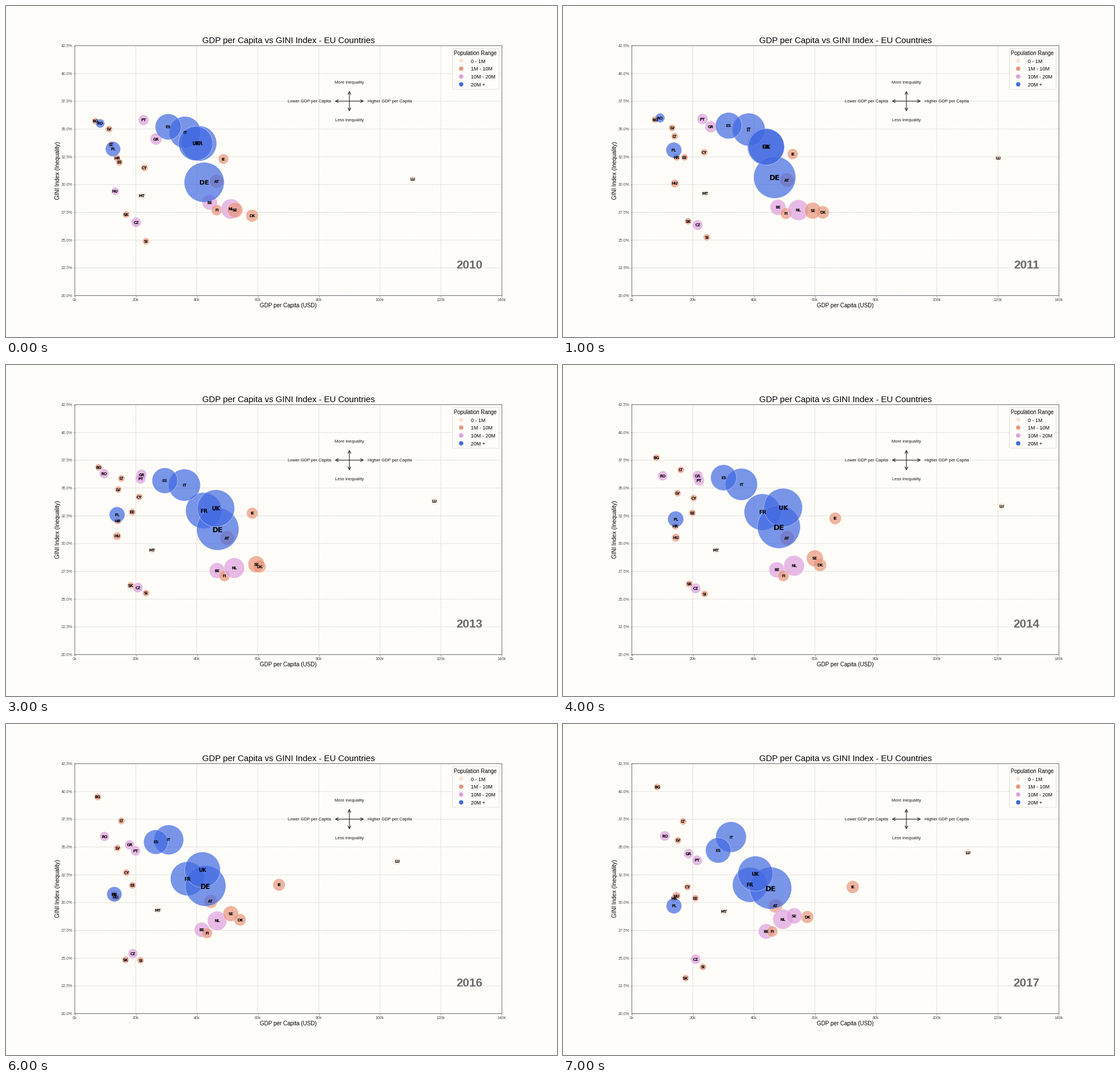
Animation, 966 px wide and 580 px high, one loop 8 s. Source, as a matplotlib script:

```python
import matplotlib.pyplot as plt
import numpy as np
from matplotlib.animation import FuncAnimation
from matplotlib.patches import Circle, FancyArrowPatch, FancyBboxPatch

W, H, DPI = 966, 580, 100
PT = 72 / DPI  # points per pixel
BG = "#fffdf9"
INK = "#1a1a1a"
COLORS = ["#fce5d3", "darksalmon", "plum", "royalblue"]
GROUPS = ["0 - 1M", "1M - 10M", "10M - 20M", "20M +"]

FIRST_YEAR, YEARS = 2010, 8
KEY_TIMES = [0, 2, 5, 7]
# Dollar swing shared by all countries between the key years
SWING = np.array([1, 1.075, 1, 1.07, 1.125, 1, 0.98, 1])

plt.rcParams["font.family"] = "Liberation Sans"


class Country:
    """A bubble passing through four (income in k USD, GINI) key points."""

    def __init__(self, code, people, *keys):
        t = np.arange(YEARS)
        income, gini = np.transpose(keys)
        self.code = code
        self.income = np.interp(t, KEY_TIMES, income) * SWING
        self.gini = np.interp(t, KEY_TIMES, gini)
        # Richer countries grow, poorer ones shrink
        rate = 0.004 if income[0] > 30 else -0.004
        people = people * (1 + rate) ** t  # millions
        gdp = self.income * people
        self.radius = np.maximum(6, 0.6 * np.sqrt(gdp))  # pixels
        self.font_px = np.maximum(6.7, 0.0033 * gdp)
        self.group = np.digitize(people, [1, 10, 20])


countries = [
    Country("AT", 8.4, (46.5, 30.3), (48.1, 30.5), (43.8, 30.5), (47.1, 29.7)),
    Country("BE", 11, (44.2, 28.4), (44.9, 27.5), (40.9, 27.7), (44.0, 27.4)),
    Country("BG", 7.4, (6.8, 35.7), (7.4, 36.0), (7.0, 38.6), (8.3, 40.4)),
    Country("HR", 4.3, (13.8, 32.4), (13.5, 32.5), (12.3, 31.1), (13.9, 30.4)),
    Country("CY", 1.1, (22.8, 31.5), (21.4, 34.3), (16.3, 34.0), (18.2, 31.4)),
    Country("CZ", 10.5, (20.1, 26.6), (20.0, 26.1), (17.9, 25.9), (20.9, 24.9)),
    Country("DK", 5.6, (58.1, 27.2), (58.4, 27.8), (53.0, 28.2), (57.5, 28.7)),
    Country("EE", 1.3, (14.6, 32.0), (17.5, 32.9), (17.7, 32.7), (20.8, 30.4)),
    Country("FI", 5.4, (46.5, 27.7), (47.5, 27.1), (42.5, 27.1), (46.0, 27.4)),
    Country("FR", 65, (40.7, 33.7), (40.9, 33.1), (36.6, 32.7), (38.7, 31.6)),
    Country("DE", 80.2, (42.4, 30.2), (44.7, 31.1), (41.9, 31.7), (45.5, 31.3)),
    Country("GR", 11, (26.6, 34.1), (21.6, 36.3), (18.0, 36.0), (18.6, 34.4)),
    Country("HU", 10.02, (13.2, 29.4), (13.0, 30.8), (12.7, 30.4), (14.6, 30.6)),
    Country("IE", 4.6, (48.7, 32.3), (49.4, 33.2), (64.2, 31.8), (72.4, 31.4)),
    Country("IT", 59.5, (36.1, 34.7), (35.2, 35.2), (30.3, 35.4), (32.5, 35.9)),
    Country("LV", 2.1, (11.2, 35.0), (13.3, 35.2), (13.3, 34.2), (15.1, 35.6)),
    Country("LT", 3.1, (11.9, 33.6), (14.2, 35.1), (14.3, 37.4), (16.8, 37.3)),
    Country("LU", 0.5, (110.8, 30.5), (112.5, 34.3), (105.4, 32.9), (110.2, 34.5)),
    Country("MT", 0.4, (21.9, 29.0), (22.8, 29.4), (25.4, 29.4), (30.2, 29.2)),
    Country("NL", 16.6, (51.2, 27.8), (50.4, 27.6), (45.7, 28.2), (49.5, 28.5)),
    Country("PL", 38, (12.5, 33.2), (13.1, 33.0), (12.6, 31.8), (13.8, 29.7)),
    Country("PT", 10.5, (22.5, 35.8), (20.6, 36.0), (19.1, 35.5), (21.4, 33.8)),
    Country("RO", 20.2, (8.3, 35.5), (8.9, 36.5), (9.0, 35.9), (10.8, 36.0)),
    Country("SK", 5.4, (16.8, 27.3), (17.5, 26.1), (16.3, 26.5), (17.6, 23.2)),
    Country("SI", 2.1, (23.3, 24.9), (22.4, 25.6), (20.6, 25.4), (23.3, 24.2)),
    Country("ES", 46.6, (30.6, 35.2), (28.4, 35.4), (25.9, 36.2), (28.3, 34.7)),
    Country("SE", 9.75, (52.5, 27.7), (57.8, 27.6), (51.1, 29.2), (53.2, 28.8)),
    Country("UK", 63, (39.6, 33.7), (42.4, 33.1), (44.9, 33.3), (40.5, 32.6)),
]

fig = plt.figure(figsize=(W / DPI, H / DPI), dpi=DPI, facecolor=BG)

# Chart
ax = fig.add_axes([0.125, 0.125, 0.775, 0.755], facecolor=BG)
ax.set(xlim=(0, 140), ylim=(20, 42.5),
       xticks=np.arange(0, 141, 20), yticks=np.arange(20, 42.6, 2.5))
ax.xaxis.set_major_formatter(lambda v, _: f"{v:.0f}k")
ax.yaxis.set_major_formatter(lambda v, _: f"{v:.1f}%")
ax.tick_params(length=1.6, width=0.5, pad=1.4, labelsize=7.05 * PT,
               color="#555555", labelcolor="#4d4d4d")
ax.grid(ls="--", lw=0.5, color="#c9c7c3", snap=False)
ax.set_axisbelow(True)
for spine in ax.spines.values():
    spine.set(linewidth=0.6, color="#555555", snap=False)

bubbles = ax.scatter([0] * len(countries), [0] * len(countries), alpha=0.7,
                     edgecolors="white", linewidths=0.4, zorder=3)
labels = [ax.text(0, 0, c.code, family="DejaVu Sans", weight="bold", ha="center",
                  va="center_baseline", zorder=4) for c in countries]

# Overlay in pixel coordinates, y pointing down
over = fig.add_axes([0, 0, 1, 1], xlim=(0, W), ylim=(H, 0))
over.axis("off")


def write(x, y, text, px, **kw):
    kw = {"ha": "center", "va": "center_baseline", "color": "black", **kw}
    return over.text(x, y, text, fontsize=px * PT, **kw)


write(495, 60, "GDP per Capita vs GINI Index - EU Countries", 15.03)
write(495, 524, "GDP per Capita (USD)", 9.9)
write(91.5, 288.5, "GINI Index (Inequality)", 10.1, rotation=90, va="center")
year = write(812.7, 452, "", 20.7, weight="bold", color="dimgray")

# Compass
cx, cy = 602, 166.7
for dx, dy in [(-25.5, 0), (25.5, 0), (0, -18), (0, 18)]:
    over.add_patch(FancyArrowPatch((cx, cy), (cx + dx, cy + dy), arrowstyle="->",
                                   mutation_scale=9, lw=0.75, color=INK,
                                   shrinkA=0, shrinkB=0))
write(cx, 133.5, "More inequality", 7.54, color=INK)
write(cx, 199.5, "Less inequality", 7.54, color=INK)
write(570, cy, "Lower GDP per Capita", 7.54, ha="right", color=INK)
write(634, cy, "Higher GDP per Capita", 7.54, ha="left", color=INK)

# Legend
over.add_patch(FancyBboxPatch((784.5, 76.5), 78, 67.5, fc=BG, ec="#dddddd", lw=0.6,
                              boxstyle="round,pad=2,rounding_size=2"))
write(823, 82.5, "Population Range", 9.56)
for i, (name, color) in enumerate(zip(GROUPS, COLORS)):
    y = 96 + 13.75 * i
    over.add_patch(Circle((798, y), 3.8, fc=color, ec="none"))
    write(815, y, name, 9, ha="left")


def draw(t):
    spots = [(c.income[t], c.gini[t]) for c in countries]
    bubbles.set_offsets(spots)
    bubbles.set_sizes([(2 * c.radius[t] * PT) ** 2 for c in countries])
    bubbles.set_facecolor([COLORS[c.group[t]] for c in countries])
    for c, label, spot in zip(countries, labels, spots):
        label.set_position(spot)
        label.set_fontsize(c.font_px[t] * PT)
    year.set_text(str(FIRST_YEAR + t))
    return [bubbles, year, *labels]


anim = FuncAnimation(fig, draw, frames=YEARS, interval=1000, repeat=True)
plt.show()
```
